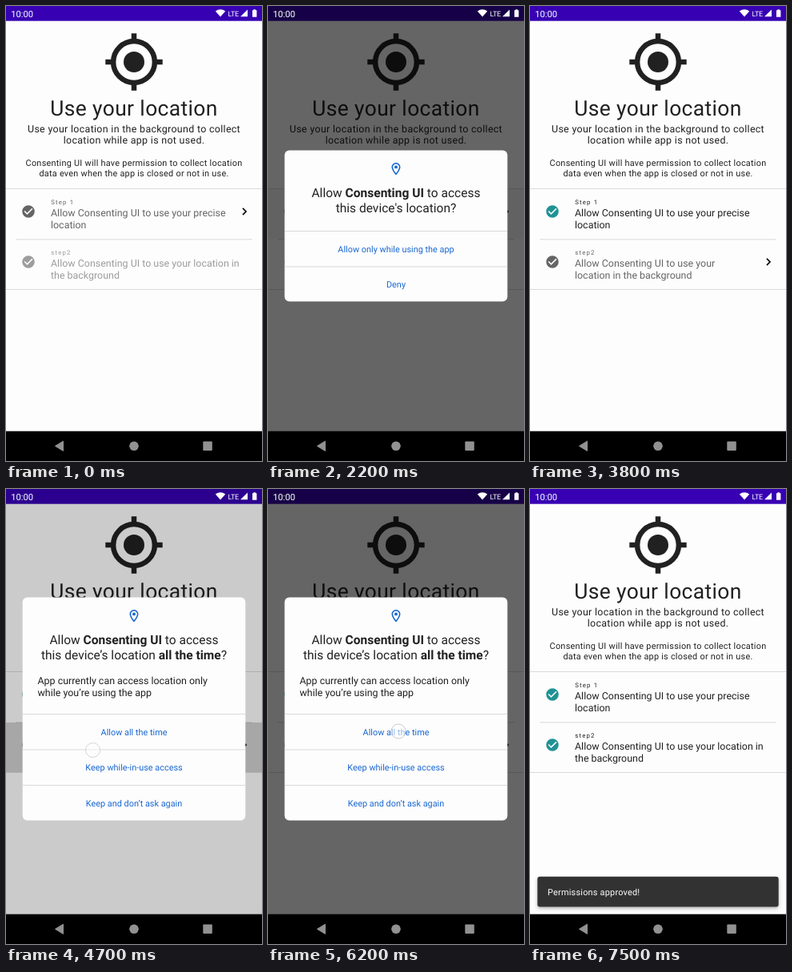
An HTML page for the animation above (7.7 s loop, 320x569 px).

```html
<!DOCTYPE html>
<html lang="en">
<head>
<meta charset="utf-8">
<title>Location permission flow</title>
<style>
  html, body { margin: 0; width: 100%; height: 100%; overflow: hidden; background: #fdfdfd; }
  svg { display: block; width: 100vw; height: 100vh; font-family: Roboto, sans-serif; text-rendering: geometricPrecision; }
  .mid { text-anchor: middle; }
  .headline { font-size: 26.4px; letter-spacing: .37px; }
  .body { font-size: 12.45px; letter-spacing: .31px; }
  .small { font-size: 10.89px; letter-spacing: .25px; }
  .over { font-size: 7.8px; letter-spacing: 1.17px; }
  .step { font-size: 12.45px; }
  .ask { font-size: 15.56px; fill: #212121; }
  .ask tspan { font-weight: 700; }
  .button { font-size: 10.89px; fill: #1967d2; }
  .ink { fill: #212121; }
  .line { fill: #dadada; }
</style>
</head>
<body>
<svg viewBox="0 0 320 569" xmlns="http://www.w3.org/2000/svg">
  <defs>
    <path id="tick" d="M12 2a10 10 0 1 0 0 20 10 10 0 0 0 0-20zm-2 15l-5-5 1.41-1.41L10 14.17l7.59-7.59L19 8z"/>
    <path id="chevron" d="M10 6 8.59 7.41 13.17 12l-4.58 4.59L10 18l6-6z"/>
    <g id="pin" fill="#1967d2">
      <path fill-rule="evenodd" d="M12 2C8.13 2 5 5.13 5 9c0 5.25 7 13 7 13s7-7.75 7-13c0-3.87-3.13-7-7-7zM7 9c0-2.76 2.24-5 5-5s5 2.24 5 5c0 2.88-2.88 7.19-5 9.88C9.92 16.21 7 11.85 7 9z"/>
      <circle cx="12" cy="9" r="2.5"/>
    </g>
    <clipPath id="row0"><rect y="229" width="320" height="62"/></clipPath>
    <clipPath id="row1"><rect y="292" width="320" height="62"/></clipPath>
    <filter id="shadow" x="-10%" y="-30%" width="120%" height="180%">
      <feDropShadow dx="0" dy="2" stdDeviation="2" flood-opacity=".3"/>
    </filter>
  </defs>

  <rect width="320" height="569" fill="#fdfdfd"/>
  <rect width="320" height="18.67" fill="#3700b3"/>

  <g transform="translate(160 70)">
    <circle r="13" class="ink"/>
    <circle r="25.9" fill="none" stroke="#212121" stroke-width="6.5"/>
    <path d="M0-35.7v8M0 35.7v-8M-35.7 0h8M35.7 0h-8" stroke="#212121" stroke-width="6.5"/>
  </g>
  <g class="mid ink">
    <text class="headline" x="160" y="137">Use your location</text>
    <text class="body" x="160" y="158.2">Use your location in the background to collect</text>
    <text class="body" x="160" y="172.4">location while app is not used.</text>
    <text class="small" x="160" y="200.2">Consenting UI will have permission to collect location</text>
    <text class="small" x="160" y="213.2">data even when the app is closed or not in use.</text>
  </g>
  <g class="line">
    <rect y="228" width="320" height="1"/>
    <rect x="12" y="291.4" width="296" height="1"/>
    <rect y="354" width="320" height="1"/>
  </g>
  <g id="steps"></g>

  <g id="snackbar">
    <rect x="9.3" y="484.7" width="301.4" height="37.7" rx="3" fill="#323232" filter="url(#shadow)"/>
    <text x="22" y="507.6" font-size="10.89" letter-spacing=".23" fill="#fff">Permissions approved!</text>
  </g>

  <rect id="dim" width="320" height="532"/>
  <g id="dialogs"></g>

  <g fill="#fff">
    <text x="6.2" y="13.5" font-size="11.2">10:00</text>
    <path d="M268 13.6 261.8 6.4Q268 2.2 274.2 6.4z"/>
    <text x="277.6" y="12.7" font-size="9" letter-spacing="-.3">LTE</text>
    <path d="M302 4.6v8.7h-9z"/>
    <path d="M308 5.2h1.5V4.2h2.4v1h1.5v8.5H308z"/>
  </g>
  <rect y="531.7" width="320" height="37.3"/>
  <g fill="#919191">
    <path d="M61.5 550.3 71.5 544.2v12.2z" stroke="#919191" stroke-linejoin="round"/>
    <circle cx="160" cy="550.3" r="5.8"/>
    <rect x="246.3" y="544.6" width="11.5" height="11.5" rx="1"/>
  </g>
  <circle id="touch" r="9" fill="#fff" fill-opacity=".55" stroke="#a9b0bf" stroke-opacity=".65"/>
</svg>

<script>
const LOOP = 7700, APP = "Consenting UI";
const HIGH = .87, MEDIUM = .6, DISABLED = .38;
const $ = id => document.getElementById(id);
const clamp = x => Math.min(1, Math.max(0, x));
const ramp = (t, a, b) => clamp((t - a) / (b - a));
const easeOut = x => 1 - (1 - x) ** 3;
const set = (el, attrs) => { for (const k in attrs) el.setAttribute(k, attrs[k]); };

const NARROW = [`Allow ${APP} to use your`, "location in the background"];
const WIDE = [`Allow ${APP} to use your location in`, "the background"];
const LABELS = ["Step 1", "step2"];

// Taps on the two rows and on the two dialog buttons, in order.
const taps = [
  { x: 150, y: 262, from: 1570, to: 1830 },
  { x: 162.5, y: 300, from: 3480, to: 3680 },
  { x: 108.5, y: 326.5, from: 4280, to: 4780 },
  { x: 163, y: 303, from: 6180, to: 6380 }
];
const ripples = [
  { tap: taps[0], fade: 1920, end: 2250 },
  { tap: taps[2], fade: 4700, end: 4900 }
];
const dialogs = [
  { top: 180.5, open: 1873, close: 3650,
    ask: [`Allow <tspan>${APP}</tspan> to access`, "this device's location?"],
    note: [], buttons: ["Allow only while using the app", "Deny"] },
  { top: 135.5, open: 4605, close: 6350,
    ask: [`Allow <tspan>${APP}</tspan> to access`, "this device’s location <tspan>all the time</tspan>?"],
    note: ["App currently can access location only", "while you’re using the app"],
    buttons: ["Allow all the time", "Keep while-in-use access", "Keep and don’t ask again"] }
];
const EXIT = 140;

function stepMarkup(label, i) {
  const y = 63 * i;
  return `<g>
    <g clip-path="url(#row${i})"><circle class="ripple"/></g>
    <use class="mark" href="#tick" transform="translate(18.67 ${247.7 + y}) scale(.778)"/>
    <g class="copy">
      <text class="over" x="56.3" y="${248 + y}">${label}</text>
      <text class="step" x="56" y="${263.4 + y}">Allow ${APP} to use your precise</text>
      <text class="step" x="56" y="${277.8 + y}">location</text>
    </g>
    <use class="arrow" href="#chevron" transform="translate(288.7 ${247.7 + y}) scale(.778)"/>
  </g>`;
}

function dialogMarkup({ top, ask, note, buttons }) {
  const lines = (list, cls, x, y, gap) =>
    list.map((s, i) => `<text class="${cls}" x="${x}" y="${y + gap * i}">${s}</text>`).join("");
  const rules = buttons.map((_, i) =>
    `<rect class="line" x="21" y="${281 + 44.5 * i}" width="278" height="1"/>`).join("");
  return `<g>
    <rect x="20.7" y="${top}" width="278.6" height="${100 + 44.5 * buttons.length + (note.length ? 45.5 : 0)}" rx="6" fill="#fdfdfd"/>
    <use href="#pin" transform="translate(150.66 ${top + 13.9}) scale(.778)"/>
    ${lines(ask, "ask mid", 160, top + 58.8, 18.6)}
    ${lines(note, "step ink", 39.5, 244.2, 14.5)}
    ${rules}
    ${lines(buttons, "button mid", 160, 307.7, 44.6)}
  </g>`;
}

$("steps").innerHTML = LABELS.map(stepMarkup).join("");
$("dialogs").innerHTML = dialogs.map(dialogMarkup).join("");

const steps = [...$("steps").children].map(g => ({
  ripple: g.querySelector(".ripple"),
  mark: g.querySelector(".mark"),
  copy: g.querySelector(".copy"),
  lines: g.querySelectorAll(".step"),
  arrow: g.querySelector(".arrow")
}));
const panels = [...$("dialogs").children];

function drawStep(i, t, done) {
  const s = steps[i], r = ripples[i];
  const finished = done > i, active = done === i;
  const level = finished ? HIGH : active ? MEDIUM : DISABLED;
  set(s.mark, { fill: finished ? "#1f9295" : "#000", opacity: finished ? 1 : level });
  set(s.copy, { opacity: level });
  set(s.arrow, { visibility: active ? "visible" : "hidden" });
  if (i === 1) (active ? NARROW : WIDE).forEach((text, n) => {
    if (s.lines[n].textContent !== text) s.lines[n].textContent = text;
  });

  const { x, y, from } = r.tap;
  const grow = easeOut(ramp(t, from, from + 300));
  const cy = 260 + 63 * i;
  set(s.ripple, {
    cx: x + (160 - x) * grow,
    cy: y + (cy - y) * grow,
    r: 96 + 67 * grow,
    opacity: .18 * ramp(t, from, from + 75) * (1 - ramp(t, r.fade, r.end))
  });
}

function draw(t) {
  const done = dialogs.filter(d => t >= d.close + 40).length;
  steps.forEach((_, i) => drawStep(i, t, done));

  let dim = 0;
  dialogs.forEach((d, i) => {
    const leave = 1 - ramp(t, d.close, d.close + EXIT);
    dim += .6 * ramp(t, d.open, d.open + 290) * leave;
    set(panels[i], { opacity: t >= d.open ? leave : 0 });
  });
  set($("dim"), { opacity: dim });

  const show = easeOut(ramp(t, 6540, 6700));
  const scale = .8 + .2 * show;
  set($("snackbar"), {
    opacity: show,
    transform: `translate(160 503.6) scale(${scale}) translate(-160 -503.6)`
  });

  const tap = taps.find(p => t >= p.from && t < p.to);
  set($("touch"), tap
    ? { cx: tap.x, cy: tap.y, opacity: 1 - .6 * ramp(t, tap.to - 120, tap.to) }
    : { opacity: 0 });
}

const start = performance.now();
function tick() {
  draw((performance.now() - start) % LOOP);
  requestAnimationFrame(tick);
}
tick();
</script>
</body>
</html>
```
